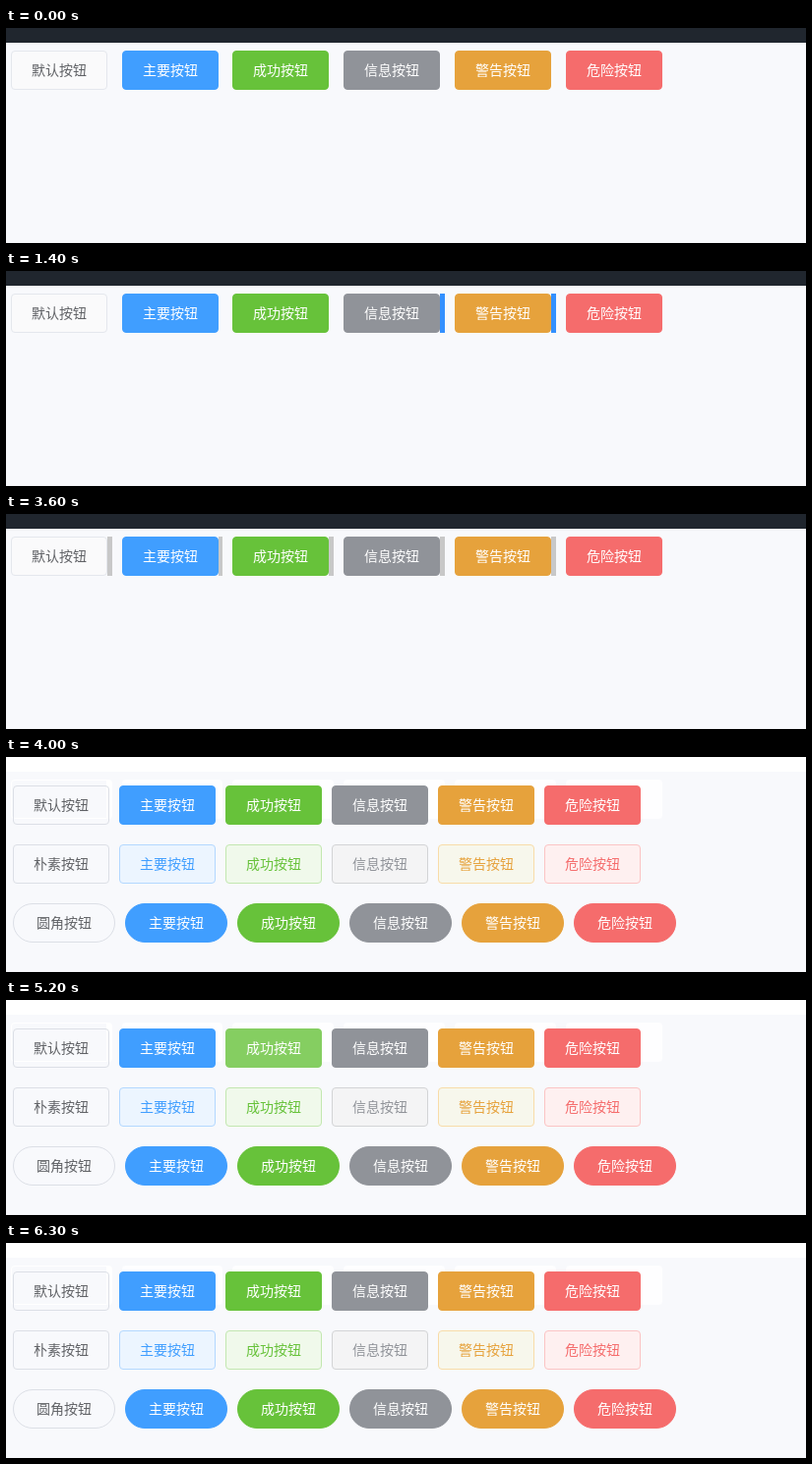
An HTML page that plays this animation: 813 by 219 pixels, repeating every 8 s.

```html
<!DOCTYPE html>
<html lang="zh-CN">
<head>
<meta charset="utf-8">
<style>
html, body { margin: 0; width: 100%; height: 100%; overflow: hidden; background: #f8f9fc; }
.scene { position: absolute; left: 0; top: 0; width: 813px; height: 219px; overflow: hidden; }
.scene div { position: absolute; box-sizing: border-box; }
.strip { left: 0; top: 0; width: 813px; height: 15px; }
.button {
  height: 40px; border: 1px solid; border-radius: 4px; text-align: center; white-space: nowrap;
  font: 400 14px/36px "Noto Sans CJK SC", "Noto Sans CJK", sans-serif;
}
.ghost { top: 23px; height: 40px; border-radius: 4px; }
.gap { top: 23px; height: 40px; }
</style>
</head>
<body>
<div class="scene" id="select"></div>
<div class="scene" id="gallery"></div>
<script>
const LOOP = 8000, SWITCH = 4000;
const kinds = [
  { label: '默认', color: '#606266' },
  { label: '主要', color: '#409eff', hover: '#66b1ff', pale: '#ecf5ff', edge: '#b3d8ff' },
  { label: '成功', color: '#67c23a', hover: '#85ce61', pale: '#f0f9eb', edge: '#c2e7b0' },
  { label: '信息', color: '#909399', hover: '#a6a9ad', pale: '#f4f4f5', edge: '#d3d4d6' },
  { label: '警告', color: '#e6a23c', hover: '#ebb563', pale: '#f7f7ec', edge: '#f8dca8' },
  { label: '危险', color: '#f56c6c', hover: '#f78989', pale: '#fef0f0', edge: '#fbc4c4' }
];
const selectX = [5, 118, 230, 343, 456, 569];
const gapEnds = [108, 220, 333, 446, 559, 667];
const gapTimes = [2000, 1700, 1500, 1400, 1100];

// Pointer visits: [start, end, button index]
const selectHovers = [[900, 1100, 5], [1100, 1400, 4]];
const galleryHovers = [
  [4800, 4900, 5], [4900, 5000, 4], [5200, 5300, 2],
  [5300, 5400, 1], [5500, 6300, 0]
];

const select = document.getElementById('select');
const gallery = document.getElementById('gallery');

function add(parent, className, style, text = '') {
  const el = document.createElement('div');
  el.className = className;
  el.textContent = text;
  Object.assign(el.style, style);
  parent.append(el);
  return el;
}

function paint(el, background, border, color) {
  Object.assign(el.style, { background, borderColor: border, color });
}

function addButton(parent, label, x, y, width, radius = 4) {
  return add(parent, 'button', {
    left: x + 'px', top: y + 'px', width: width + 'px', borderRadius: radius + 'px'
  }, label + '按钮');
}

function paintSolid(el, kind, hovered) {
  const fill = hovered ? kind.hover : kind.color;
  paint(el, fill, fill, '#fff');
}

add(select, 'strip', { background: '#20262e' });
const selectButtons = kinds.map((kind, i) => addButton(select, kind.label, selectX[i], 23, 98));
paint(selectButtons[0], '#fafafb', '#e4e7ed', '#606266');
const gaps = gapTimes.map((_, i) => {
  const left = selectX[i] + 98;
  return add(select, 'gap', { left: left + 'px', width: gapEnds[i] - left + 'px' });
});

add(gallery, 'strip', { background: '#fff' });
selectX.forEach((x, i) => {
  add(gallery, 'ghost', {
    left: x + 'px', width: gapEnds[i] - x + 'px',
    ...(i ? { background: '#fefeff' } : { border: '1px solid #fff', borderRightWidth: '6px' })
  });
});
const galleryButtons = kinds.map((kind, i) => {
  const x = 7 + 108 * i;
  const plain = addButton(gallery, i ? kind.label : '朴素', x, 89, 98);
  const round = addButton(gallery, i ? kind.label : '圆角', 7 + 114 * i, 149, 104, 20);
  if (i) {
    paint(plain, kind.pale, kind.edge, kind.color);
    paintSolid(round, kind, false);
  } else {
    [plain, round].forEach(el => paint(el, 'transparent', '#dcdfe6', kind.color));
  }
  return addButton(gallery, kind.label, x, 29, 98);
});

function paintRow(buttons, hovers, t) {
  const visit = hovers.find(([start, end]) => t >= start && t < end);
  for (let i = 1; i < kinds.length; i++) {
    paintSolid(buttons[i], kinds[i], visit && visit[2] === i);
  }
  return visit;
}

function render(t) {
  const selecting = t < SWITCH;
  select.style.display = selecting ? '' : 'none';
  gallery.style.display = selecting ? 'none' : '';

  if (selecting) {
    paintRow(selectButtons, selectHovers, t);
    gaps.forEach((gap, i) => {
      gap.style.visibility = t >= gapTimes[i] ? 'inherit' : 'hidden';
      gap.style.background = t < 3600 ? '#3390ff' : '#c8c8c8';
    });
    return;
  }

  const visit = paintRow(galleryButtons, galleryHovers, t);
  if (visit && visit[2] === 0) {
    const pressed = t >= 5700 && t < 5800;
    const text = t >= 6200 ? '#606266' : pressed ? '#3a8ee6' : '#409eff';
    paint(galleryButtons[0], '#ecf5ff', '#c6e2ff', text);
  } else {
    paint(galleryButtons[0], 'transparent', '#dcdfe6', '#606266');
  }
}

const origin = performance.now();
function tick() {
  render((performance.now() - origin) % LOOP);
  requestAnimationFrame(tick);
}
tick();
</script>
</body>
</html>
```
